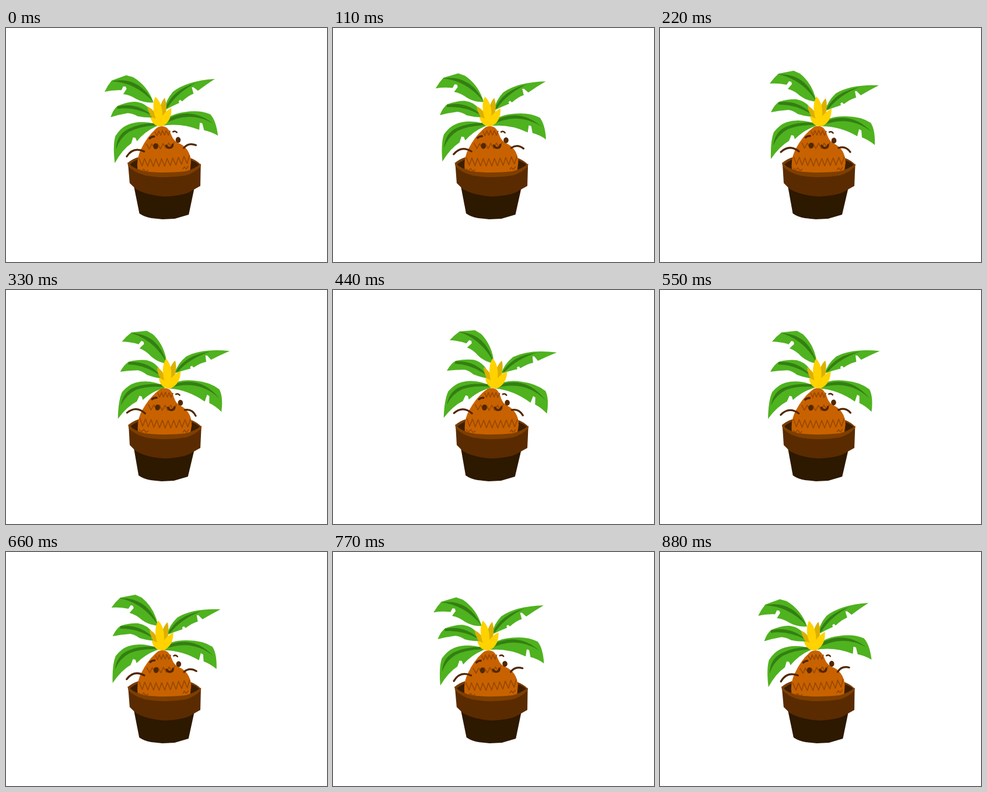
Animation, 550 px wide and 400 px high, one loop 990 ms. Source, as an HTML page:

```html
<!DOCTYPE html>
<html lang="en">
<head>
<meta charset="utf-8">
<title>Swaying potted plant</title>
<style>
  html, body { margin: 0; width: 100%; height: 100%; overflow: hidden; background: #fff; }
  svg { display: block; width: 550px; height: 400px; }
  .leaf { fill: #4fb21f; }
  .vein { fill: #337f12; }
  .ink { fill: #522700; }
  .line { fill: none; stroke: #522700; stroke-width: 3.2; stroke-linecap: round; }
  .zig { fill: none; stroke: #984800; stroke-width: 1.7; stroke-linejoin: round; }
  .gold { fill: #ffd200; }
  .amber { fill: #dcb000; }
</style>
</head>
<body>
<svg viewBox="0 0 550 400">
  <g class="pot">
    <path fill="#7a3c00" d="M209 231 Q217 224 227 221 L314 221 Q328 226 335 234 L320 248 L225 246Z"/>
    <path fill="#3c1e00" d="M213 233 Q222 226 230 224 L312 224 Q326 228 332 234 L318 247 L225 246Z"/>
  </g>

  <g id="lowLeft">
    <path class="leaf" d="M190 224 Q189 193 195 178 Q205 165 217 161 Q242 153 272 166 Q249 172 231 190 L229 184 L225 183 L221 193 Q205 202 190 224Z"/>
    <path class="vein" d="M194 201 Q197 176 218 168 Q238 160 266 162 L266 166 Q238 165 219 173 Q202 182 194 201Z"/>
  </g>
  <g id="midLeft">
    <path class="leaf" d="M190 144 Q196 131 204 126 Q222 121 234 122 Q251 125 259 139 L264 152 Q248 151 236 147 Q228 141 220 140 Q205 141 190 144Z"/>
    <path class="vein" d="M203 127 Q237 122 262 149 Q233 130 203 131Z"/>
  </g>
  <g id="topLeft">
    <path class="leaf" d="M188 95 Q195 85 203 78 L229 73 L240 78 Q262 96 268 126 Q252 125 240 116 Q230 107 219 104 L226 96 L225 92 L221 91 L217 97 Q202 94 188 95Z"/>
    <path class="vein" d="M202 79 Q249 77 267 124 Q242 87 202 79Z"/>
  </g>
  <g id="topRight">
    <path class="leaf" d="M283 142 Q287 125 301 112 Q327 96 375 98 Q359 106 344 115 L337 108 L334 108 L336 119 Q327 121 315 130 L312 127 L309 129 L310 132 Q297 136 283 142Z"/>
    <path class="vein" d="M285 139 Q300 109 342 101 Q308 114 289 138Z"/>
  </g>
  <g id="lowRight">
    <path class="leaf" d="M274 164 Q291 150 318 151 Q344 151 361 162 Q369 174 368 200 Q357 191 346 187 L345 175 L341 173 L338 185 Q307 167 274 168Z"/>
    <path class="vein" d="M276 163 Q325 138 363 178 Q325 147 276 167Z"/>
  </g>

  <g id="body">
    <path fill="#c86200" d="M264 169 Q272 166 279 170 Q284 174 287 184 Q290 193 297 197 Q317 206 318 230 L315 250 L227 250 Q222 224 234 204 Q246 182 264 169Z"/>
    <path id="zigTop" class="zig"/>
    <path id="zigMid" class="zig"/>
    <path id="zigLow" class="zig"/>
    <path class="zig" d="M228 239 l4 4 l4 -4 l4 5 l4 -3 M303 243 l3 -4 l3 4 l4 -5"/>
    <path class="line" style="stroke-width:3.600" d="M249.500 187 Q253 184 257 184.500"/>
    <path class="line" style="stroke-width:2.500" d="M290 178 Q294 176 296.500 179.500"/>
    <ellipse class="ink" cx="259" cy="201" rx="4.300" ry="5"/>
    <ellipse class="ink" cx="298" cy="192.500" rx="4.300" ry="5"/>
    <path class="line" style="stroke-width:3.600" d="M277 201 Q279 206 284 205 Q288 204 288 200"/>
  </g>
  <path id="armLeft" class="line" d="M238 211 Q222 198 207 212"/>
  <path id="armRight" class="line" d="M306 205 Q318 201 326 212"/>

  <g id="flower">
    <path class="amber" d="M271 165 Q272 131 284 120 Q290 139 277 166Z M269 163 Q255 150 253 133 Q267 139 272 162Z"/>
    <path class="gold" d="M272 168 Q257 138 268 117 Q283 132 276 164Z"/>
    <path class="gold" d="M271 167 Q275 147 294 138 Q294 160 278 168Z"/>
    <path class="gold" d="M274 168 Q261 168 257 152 Q269 152 275 166Z"/>
  </g>

  <g class="pot">
    <path fill="#2d1800" d="M219 270 L227.500 317 Q236 323 248 325 L267 327 L288 326 L312 319 L323 272Z"/>
    <path fill="#5a2b00" d="M210 233 L212 265 L222 275 Q240 286 271 288 Q299 287 313 281 L333 270 L334.500 234 Q321 245 308 249 Q272 254 239 248 Q220 243 210 233Z"/>
    <path fill="#7e3e00" d="M209 230 Q219 241 239 245 Q272 249 308 245 Q323 241 335 232 L334 237 Q323 248 308 252 Q272 258 239 252 Q220 247 210 236Z"/>
  </g>
</svg>
<script>
  const STEP = 110, STEPS = 9, REST = 2;
  const BODY_PEAK = 3.3, LEAF_PEAK = 4;   // the leaves trail the body
  const $ = id => document.getElementById(id);
  const setTransform = (element, value) => element.setAttribute('transform', value);

  // Cosine swing over the loop, zero in the drawn pose.
  const wave = (step, peak) => Math.cos((step - peak) / STEPS * 2 * Math.PI);
  const swing = (step, peak) => wave(step, peak) - wave(REST, peak);

  // Degrees each crown part turns about the crown's foot.
  const crownTurn = { topLeft: 8, topRight: 5.7, midLeft: 5.2, lowLeft: 4.5, lowRight: 8.4, flower: 3.4 };

  function pose(step) {
    const lean = swing(step, BODY_PEAK);
    const trail = swing(step, LEAF_PEAK);
    const crownShift = 7 * lean + 1.5 * (wave(2 * step, 2 * BODY_PEAK) - wave(2 * REST, 2 * BODY_PEAK));

    for (const [id, turn] of Object.entries(crownTurn)) {
      setTransform($(id), `translate(${crownShift} 0) rotate(${turn * trail} 272 168)`);
    }
    setTransform($('body'), `rotate(${2.5 * lean} 276 246)`);
    setTransform($('armLeft'), `translate(${lean} 0) rotate(${11 * lean} 238 211)`);
    setTransform($('armRight'), `translate(${lean} 0) rotate(${25 * lean} 306 205)`);
    for (const pot of document.querySelectorAll('.pot')) {
      setTransform(pot, `translate(0 270) skewX(${-lean}) translate(0 -270)`);
    }
  }

  function zigzag(id, x0, x1, y, height, sag, count) {
    const points = Array.from({ length: count + 1 }, (_, i) => {
      const t = i / count;
      return [x0 + (x1 - x0) * t, y + sag * Math.sin(Math.PI * t) + (i % 2) * height];
    });
    $(id).setAttribute('d', 'M' + points.join('L'));
  }
  zigzag('zigTop', 259, 285, 176, 8, -1, 8);
  zigzag('zigMid', 243, 291, 196, 9, 1, 10);
  zigzag('zigLow', 229, 316, 220, 13, 3, 18);

  const start = performance.now();
  let shown = -1;
  function tick() {
    const step = Math.floor((performance.now() - start) / STEP) % STEPS;
    if (step !== shown) pose(shown = step);
    requestAnimationFrame(tick);
  }
  tick();
</script>
</body>
</html>
```
